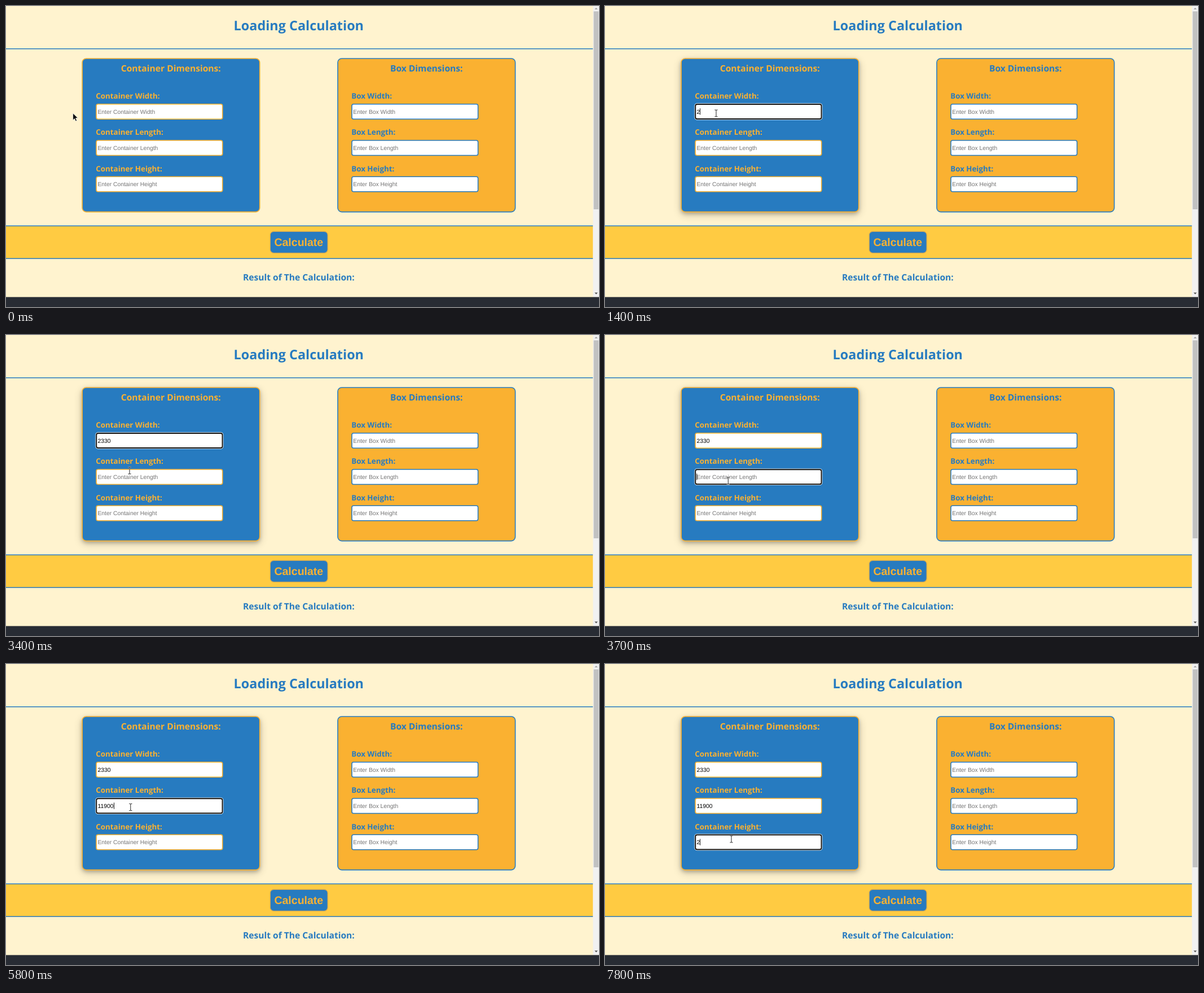
An HTML page for the animation above (8000 ms loop, 1051 by 533 pixels).

```html
<!DOCTYPE html>
<html lang="en">
<head>
<meta charset="utf-8">
<title>Loading Calculation</title>
<style>
  html, body { margin: 0; width: 100%; height: 100%; overflow: hidden; background: #fff3cf; }
  svg { display: block; text-rendering: geometricPrecision; }
  .head { font-family: "Open Sans", sans-serif; font-weight: 700; }
  .field { font: 10.35px "Liberation Sans", Arial, sans-serif; }
  .button { font: bold 19.5px "Liberation Sans", Arial, sans-serif; }
  .tip { font: 10.9px "Noto Sans", sans-serif; }
</style>
</head>
<body>
<svg id="stage" width="1051" height="533" viewBox="0 0 1051 533"></svg>
<script>
const BLUE = '#277bc0', ORANGE = '#fab131';
const EM = 15.6, ROW = 64.25, TOP = 173, FIELD_H = 28;
const stage = document.getElementById('stage');

function add(tag, attrs, parent = stage) {
  const el = document.createElementNS('http://www.w3.org/2000/svg', tag);
  for (const key in attrs) el.setAttribute(key, attrs[key]);
  return parent.appendChild(el);
}
const rect = (x, y, width, height, fill, more, parent) =>
  add('rect', { x, y, width, height, fill, ...more }, parent);
// Rectangle whose border lies inside the given bounds
const framed = (x, y, w, h, fill, stroke, line, rx, parent) =>
  rect(x + line / 2, y + line / 2, w - line, h - line, fill, { rx, stroke, 'stroke-width': line }, parent);
function text(x, y, str, fill, cls, more, parent) {
  const el = add('text', { x, y, fill, class: cls, ...more }, parent);
  el.textContent = str;
  return el;
}
const heading = (x, y, str, size, fill, anchor = 'middle') =>
  text(x, y, str, fill, 'head', { 'font-size': size, 'text-anchor': anchor });
const show = (el, on) => el.setAttribute('visibility', on ? 'visible' : 'hidden');
const place = (el, x, y) => el.setAttribute('transform', `translate(${x} ${y})`);

// Page
heading(518.8, 43, 'Loading Calculation', EM * 1.5, BLUE);
rect(0, 389, 1040.4, 58, '#ffcb42');
for (const y of [75, 388.6, 446.4]) rect(0, y, 1040.4, 1.5, BLUE);
framed(467.8, 398.8, 102.8, 39, BLUE, '#d0a453', 1.1, 6);
text(518.8, 425, 'Calculate', ORANGE, 'button', { 'text-anchor': 'middle' });
heading(518.9, 486, 'Result of The Calculation:', EM, BLUE);

const shadow = add('g', {});
for (const [dy, blur, opacity] of [[3.1, 3.1, .2], [4.6, 7.7, .19]])
  rect(134.3, 92.2 + dy, 316.2, 273, '#000', { rx: 8, opacity, style: `filter: blur(${blur}px)` }, shadow);

function card(x, name, fill, ink) {
  framed(x, 92.2, 316.2, 273.2, fill, ink, 1.6, 7);
  heading(x + 158, 116, name + ' Dimensions:', EM, ink);
  return ['Width', 'Length', 'Height'].map((side, i) => {
    const y = TOP + i * ROW, hint = `Enter ${name} ${side}`;
    heading(x + 25, y - 9, `${name} ${side}:`, EM * .855, ink, 'start');
    framed(x + 25, y, 225.2, FIELD_H, '#fff', ink, 1.6, 3);
    const ring = add('g', {});
    framed(x + 24.2, y - .8, 226.8, FIELD_H + 1.6, 'none', '#fff', 1.2, 4, ring);
    framed(x + 25, y, 225.2, FIELD_H, 'none', '#101010', 1.9, 3, ring);
    const label = text(x + 28.1, y + 17.6, hint, '#757575', 'field');
    const caret = rect(0, y + 8.2, .9, 11.4, '#000');
    return { x: x + 28.1, hint, ring, label, caret };
  });
}
const fields = card(134.3, 'Container', BLUE, ORANGE);
for (const f of card(587.2, 'Box', ORANGE, BLUE)) {
  f.ring.remove();
  f.caret.remove();
}

// Scrollbar and bottom strip
rect(1040.4, 0, 10.6, 515.4, '#f1f1f1');
rect(1041.6, 9.5, 8.6, 350.5, '#c1c1c1');
add('path', { d: 'M1043.2 6l2.8-3 2.8 3z', fill: '#a3a3a3' });
add('path', { d: 'M1043.2 507.6l2.8 3 2.8-3z', fill: '#505050' });
rect(0, 515.4, 1051, 18, '#282c34');

// Tooltip and pointers, drawn around their own origin
const tip = add('g', {});
rect(0, 1, 141, 21, '#000', { opacity: .35, style: 'filter: blur(2.5px)' }, tip);
framed(0, 0, 141, 21, '#23262b', '#c9cbcd', 1, 0, tip);
text(5.3, 14.2, 'Lütfen bu alanı doldurun.', '#dcdddf', 'tip', {}, tip);
const arrow = add('path', {
  d: 'M0 0v12l2.8-2.6 2 4.5 2-.9-2-4.4h3.8z', fill: '#000', stroke: '#fff', 'stroke-width': .7
});
const beam = add('g', { fill: 'none' });
const beamPath = 'M-2.6-6h1.6q1 0 1 1v10q0 1-1 1h-1.6M2.6-6h-1.6q-1 0-1 1M2.6 6h-1.6q-1 0-1-1';
add('path', { d: beamPath, stroke: '#fff', 'stroke-width': 2, opacity: .7 }, beam);
add('path', { d: beamPath, stroke: '#222', 'stroke-width': 1 }, beam);

const moves = [
  { from: 0, to: 0, x: 118.7, y: 190 },
  { from: 0, to: 500, x: 197, y: 190 },
  { from: 3000, to: 3400, x: 219, y: 240 },
  { from: 3600, to: 3700, x: 218.3, y: 258 },
  { from: 3800, to: 4000, x: 220.8, y: 253.5 },
  { from: 6300, to: 6600, x: 227, y: 316 },
  { from: 6800, to: 6900, x: 224, y: 310 }
];
// One entry per field: when it is clicked, what is typed, when each key falls
const visits = [
  { click: 600, value: '2330', keys: [1400, 2000, 2100, 2400] },
  { click: 3700, value: '11900', keys: [4700, 4800, 5000, 5400, 5800] },
  { click: 7100, value: '2', keys: [7800] }
];
const BLINK = 600;

function pointer(t) {
  const i = Math.max(1, moves.findLastIndex(m => m.from < t));
  const a = moves[i - 1], b = moves[i];
  const k = Math.min(1, (t - b.from) / (b.to - b.from));
  const ease = k * (2 - k);
  return { x: a.x + (b.x - a.x) * ease, y: a.y + (b.y - a.y) * ease, rested: t - b.to >= 100 };
}

function fieldAt(x, y) {
  const row = (y - TOP) / ROW;
  return x > 159 && x < 385 && row % 1 < FIELD_H / ROW ? Math.floor(row) : -1;
}

function draw(now) {
  const t = Math.floor(now % 8000 / 100) * 100;
  const { x, y, rested } = pointer(t);
  const over = fieldAt(x, y);
  const active = visits.findLastIndex(v => v.click <= t);
  place(arrow, x, y);
  place(beam, x, y);
  place(tip, Math.round(x) + 7, Math.round(y) + 24);
  show(arrow, over < 0);
  show(beam, over >= 0);
  show(tip, over >= 0 && over !== active && rested);
  shadow.setAttribute('opacity', Math.min(1, Math.max(0, (t - 100) / 300)));

  fields.forEach((f, i) => {
    const { click, value, keys } = visits[i];
    const hits = keys.filter(k => k <= t);
    const typed = value.slice(0, hits.length);
    const idle = t - (hits.at(-1) ?? click);
    f.label.textContent = typed || f.hint;
    f.label.setAttribute('fill', typed ? '#000' : '#757575');
    f.caret.setAttribute('x', f.x + typed.length * 5.72);
    show(f.ring, i === active);
    show(f.caret, i === active && Math.floor(idle / BLINK) % 2 === 0);
  });
}

const start = performance.now();
function tick() {
  draw(performance.now() - start);
  requestAnimationFrame(tick);
}
tick();
</script>
</body>
</html>
```
